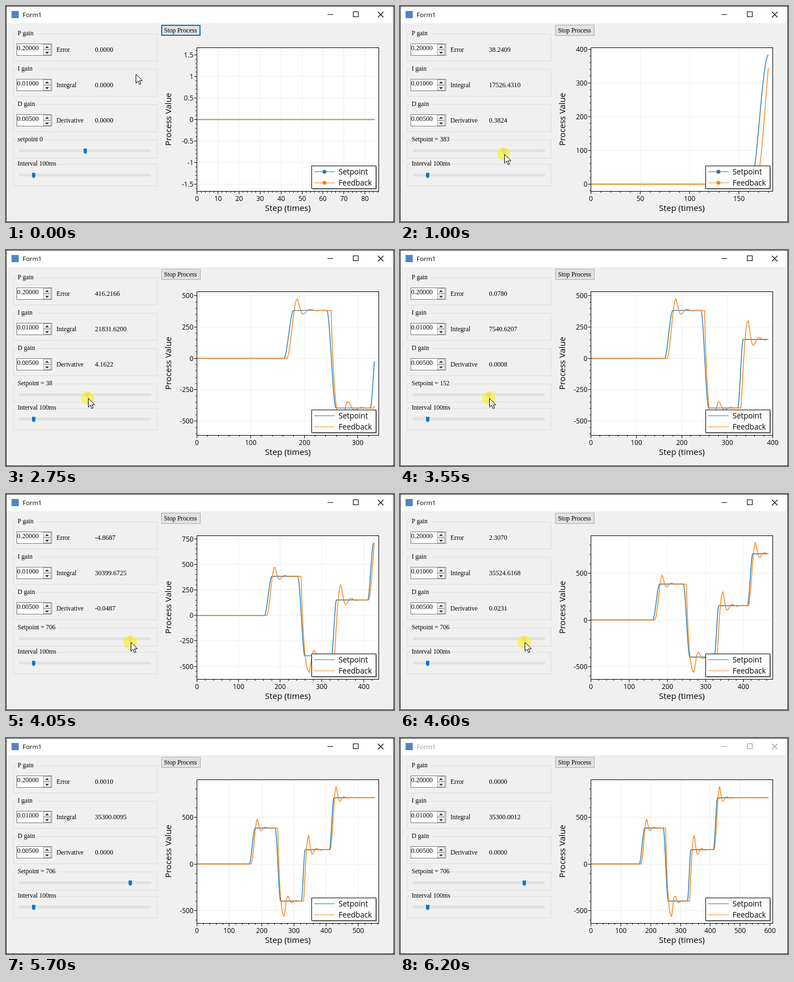
Write an HTML page that moves like this. It is 700 px wide and 391 px high and loops after 6.25 s.

```html
<!DOCTYPE html>
<html lang="en">
<head>
<meta charset="utf-8">
<title>PID form</title>
<style>
  html, body { margin: 0; width: 100%; height: 100%; overflow: hidden; background: #2b2c30; }
  svg { display: block; width: 700px; height: 391px; }
  text { white-space: pre; }
  .form { font: 11.6px "Liberation Serif", serif; }
  .num { font-size: 12px; }
  .chart, .caption { font: 12px "Open Sans", "Noto Sans", sans-serif; }
  .caption { font-size: 11.4px; }
  .axis { font-size: 15px; }
  .legend { font-size: 13.6px; }
</style>
</head>
<body>
<svg viewBox="0 0 700 391" xmlns="http://www.w3.org/2000/svg">
  <rect x="1" y="1" width="698" height="389" fill="#f0f0f0"/>
  <rect x="1" y="1" width="698" height="30" fill="#fff"/>
  <rect x="10" y="9" width="13" height="13" fill="#4f86c6"/>
  <g id="title">
    <text class="caption" x="30" y="20" fill="currentColor">Form1</text>
    <path d="M580 15.5h10M626.5 10.5h9v9h-9zM671 10.5l10 10M681 10.5l-10 10" fill="none" stroke="currentColor" stroke-width="1.1"/>
  </g>
  <g class="form" id="panel"></g>
  <g class="chart" id="chart"></g>
  <g id="pointer">
    <circle id="halo" cx="-1" cy="0" r="12" fill="#fff000" opacity=".52"/>
    <path d="M.5 .5v16l3.7-3.5 2.6 6 2.6-1.2-2.6-5.6h5.2z" fill="#fff" stroke="#000"/>
  </g>
</svg>
<script>
const LOOP = 6250, TICK = 50, PRESS = 600, RELEASE = 4700;
const BLUE = '#1f77b4', ORANGE = '#ff7f0e';
const plot = { left: 344.5, right: 672.5, top: 75.5, bottom: 335.5, dataWidth: 320 };
const $ = id => document.getElementById(id);

// Setpoint drags, in samples; the feedback follows after `lag`, peaks after `rise`, overshoots by `swing`.
const drags = [
  { at: 162, over: 18, by: 383, lag: 5, rise: 20, swing: .24, bend: 1 },
  { at: 242, over: 17, by: -779, lag: 8, rise: 20, swing: .206, bend: .45 },
  { at: 323, over: 12, by: 548, lag: 7, rise: 16, swing: .27, bend: .65 },
  { at: 410, over: 14, by: 554, lag: 2, rise: 19, swing: .21, bend: 1 }
];
const RINGING = Math.PI / 12.7, DECAY = .095;

const clamp = u => Math.min(1, Math.max(0, u));
const smooth = u => (u = clamp(u), u * u * (3 - 2 * u));

function response(n, { at, lag, rise, swing, bend }) {
  const u = clamp((n - at - lag) / rise), after = n - at - lag - rise;
  if (after < 0) return (1 + swing) * (1 - Math.cos(Math.PI * u ** bend)) / 2;
  return 1 + swing * Math.exp(-DECAY * after) * Math.cos(RINGING * after);
}

const total = part => drags.reduce((sum, drag) => sum + drag.by * part(drag), 0);
const setpoint = n => total(d => smooth((n - d.at) / d.over));
const feedback = n => total(d => response(n, d));

// The sample rate drifts slowly around 82 per second.
function sampleCount(time) {
  const s = time / 1000;
  return 84.4 + 82.2 * s + s * (6.2 - s) * (2.3 + .47 * s - .196 * s * s);
}

const fixed = v => (Math.abs(v) < 0.00005 ? 0 : v).toFixed(4);
const label = (x, y, s, extra = '') => `<text x="${x}" y="${y}" ${extra}>${s}</text>`;
const box = (x, y, w, h, fill, stroke, extra = '') =>
  `<rect x="${x}" y="${y}" width="${w}" height="${h}" fill="${fill}" stroke="${stroke}" ${extra}/>`;
const path = (d, stroke, width = 1) =>
  `<path d="${d}" fill="none" stroke="${stroke}" stroke-width="${width}"/>`;

function group(y, height, caption, width) {
  return box(13.5, y + .5, 259, height, 'none', '#dcdcdc') +
    `<rect x="19" y="${y - 3}" width="${width}" height="8" fill="#f0f0f0"/>` + label(21, y + 3, caption);
}

function gainRow(y, name, gain, term, value) {
  const spin = (top, d) => box(67.5, top + .5, 13, 9, '#f0f0f0', '#acacac') + `<path d="${d}" fill="#303030"/>`;
  return group(y, 49, name + ' gain', 37) +
    box(19.5, y + 18.5, 63, 21, '#fff', '#7a7a7a') +
    label(20, y + 30, gain, 'class="num"') +
    spin(y + 19, `M70.5 ${y + 26}h7l-3.5-3.5z`) + spin(y + 29, `M70.5 ${y + 33}h7l-3.5 3.5z`) +
    label(91, y + 33, term) + label(160.5, y + 33, fixed(value), 'class="num"');
}

function slider(x, y, color) {
  return box(24.5, y + .5, 236, 3, '#e7eaea', '#d6d6d6') +
    `<path d="M${x - 3} ${y - 2}h6v7l-3 3l-3-3z" fill="${color}"/>`;
}

function drawPanel(time, n, target, pressed) {
  const error = target - feedback(n);
  const integral = 50 * feedback(n - 2) + 100 * error;
  const moved = n + 1 > drags[0].at;
  const caption = moved ? 'Setpoint = ' + target : 'setpoint 0';
  $('panel').innerHTML =
    gainRow(50, 'P', '0.20000', 'Error', error) +
    gainRow(114, 'I', '0.01000', 'Integral', integral) +
    gainRow(178, 'D', '0.00500', 'Derivative', error / 100) +
    group(242, 33, caption, caption.length * 5.1) + slider(143 + target * .115, 260, pressed ? '#cccccc' : '#0078d7') +
    group(286, 39, 'Interval 100ms', 73) + slider(50, 304, '#0078d7') +
    (time < PRESS ? box(281, 35, 69, 18, '#e1e1e1', '#0078d7', 'stroke-width="2"')
                  : box(280.5, 34.5, 70, 19, '#e1e1e1', '#adadad')) +
    label(285, 48, 'Stop Process');
}

// Spacing two levels coarser than the first one that is too dense.
function tickSpacing(range, limit) {
  const list = [10 ** Math.ceil(Math.log10(range))], divisors = [2, 2, 2.5];
  for (let i = 0; range / list[list.length - 1] < limit; i++) list.push(list[list.length - 1] / divisors[i % 3]);
  return list[Math.max(0, list.length - 3)];
}

function eachTick(min, max, step, visit) {
  for (let i = Math.ceil(min / step); i * step <= max; i++) visit(i * step, i);
}

function drawChart(n) {
  const { left, right, top, bottom, dataWidth } = plot;
  const samples = Array.from({ length: Math.ceil(n) }, (_, i) => i).concat(n);
  const series = [setpoint, feedback].map(f => samples.map(f));
  const values = series.flat();
  let low = Math.min(...values), high = Math.max(...values);
  if (low === high) { low = -1.5; high = 1.5; }
  const pad = (high - low) / 18;
  low -= pad;
  high += pad;
  const xMax = n * (right - left) / dataWidth;
  const px = v => left + v / xMax * (right - left);
  const py = v => bottom - (v - low) / (high - low) * (bottom - top);
  const snap = v => Math.round(v - .5) + .5;

  let grid = '', ticks = '', labels = '';
  const xStep = tickSpacing(xMax, xMax > 100 ? 13 : 20.4);
  eachTick(0, xMax, xStep / 5, (v, i) => {
    const x = snap(px(v)), major = i % 5 === 0;
    ticks += `M${x} ${bottom}v${major ? 5 : 2.5}`;
    if (!major) return;
    grid += `M${x} ${top}V${bottom}`;
    labels += label(x, 353, +v.toFixed(6), 'text-anchor="middle"');
  });
  const yStep = tickSpacing(high - low, 14.3);
  eachTick(low, high, yStep / 5, (v, i) => {
    const y = snap(py(v)), major = i % 5 === 0;
    ticks += `M${left} ${y}h${major ? -5 : -2.5}`;
    if (!major) return;
    grid += `M${left} ${y}H${right}`;
    labels += label(338, y + 4.3, +v.toFixed(6), 'text-anchor="end"');
  });

  const dense = n > dataWidth;
  const curve = (ys, color) =>
    path('M' + ys.map((y, i) => px(samples[i]).toFixed(2) + ' ' + py(y).toFixed(2)).join('L'), color, 1.4);
  const key = (y, color, name) => path(`M556 ${y}h37`, color, 1.2) +
    (dense ? '' : `<circle cx="574.5" cy="${y}" r="3.5" fill="${color}"/>`) +
    label(600, y + 5, name, 'class="legend"');

  $('chart').innerHTML =
    box(left, top, right - left, bottom - top, '#fff', 'none') + path(grid, '#eeeeee') +
    curve(series[0], BLUE) + curve(series[1], ORANGE) +
    '<rect x="553" y="291" width="117" height="42" fill="#000" opacity=".2"/>' +
    box(551.5, 289.5, 116, 41, '#fff', '#000') +
    key(300, BLUE, 'Setpoint') + key(320, ORANGE, 'Feedback') +
    box(left, top, right - left, bottom - top, 'none', '#000') + path(ticks, '#000') + labels +
    label(508.5, 371, 'Step (times)', 'class="axis" text-anchor="middle"') +
    label(0, 0, 'Process Value', 'class="axis" text-anchor="middle" transform="translate(298 205) rotate(-90)"');
}

function drawPointer(time, target, pressed) {
  const arrive = smooth((time - 100) / 450), leave = smooth((time - RELEASE) / 400);
  const x = 234 + (144 + target * .115 - 234) * arrive + 20 * leave;
  const y = 123 + 145 * arrive + 135 * leave;
  $('pointer').setAttribute('transform', `translate(${Math.round(x)} ${Math.round(y)})`);
  $('halo').style.display = pressed ? '' : 'none';
}

function render(now) {
  const time = Math.floor(now % LOOP / TICK) * TICK;
  const n = sampleCount(time);
  const target = Math.round(setpoint(n + 1));
  const pressed = time >= PRESS && time < RELEASE;
  $('title').style.color = time >= 6150 ? '#999' : '#000';
  drawPanel(time, n, target, pressed);
  drawChart(n);
  drawPointer(time, target, pressed);
}

const start = performance.now();
function loop() {
  render(performance.now() - start);
  requestAnimationFrame(loop);
}
loop();
</script>
</body>
</html>
```
